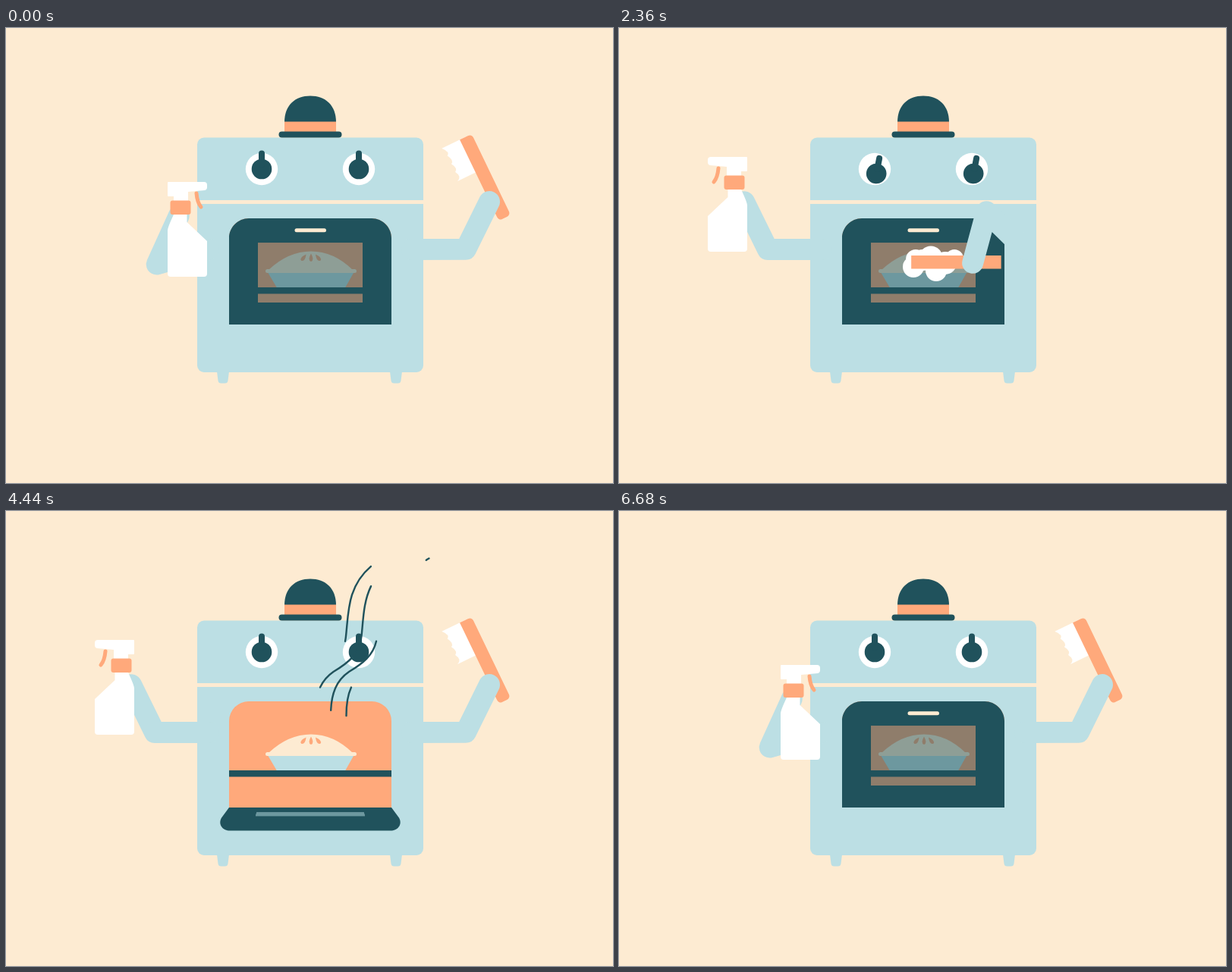
An HTML page with a canvas that plays this animation: 800 by 600 pixels, repeating every 6720 ms.

```html
<!DOCTYPE html>
<html lang="en">
<head>
<meta charset="utf-8">
<title>Cheerful oven</title>
<style>
html, body { margin: 0; height: 100%; overflow: hidden; background: #fdebd2; }
canvas { display: block; }
</style>
</head>
<body>
<canvas id="stage" width="800" height="600"></canvas>
<script>
const c = document.getElementById('stage').getContext('2d');
const LOOP = 6720, RAD = Math.PI / 180;
const CREAM = '#fdebd2', BLUE = '#bcdfe4', DARK = '#20525c', ORANGE = '#ffa97b', WHITE = '#fff';

const lerp = (a, b, k) => a + (b - a) * k;
const clamp = k => Math.max(0, Math.min(1, k));

// cubic-bezier(.55, 0, .25, 1)
function ease(x) {
  if (x <= 0) return 0;
  if (x >= 1) return 1;
  let lo = 0, hi = 1, p;
  for (let i = 0; i < 22; i++) {
    p = (lo + hi) / 2;
    const q = 1 - p;
    if (3 * p * q * q * .55 + 3 * p * p * q * .25 + p ** 3 < x) lo = p; else hi = p;
  }
  return p * p * (3 - 2 * p);
}

// keys: [time, ...values]
function track(keys, t) {
  let i = 0;
  while (i < keys.length - 1 && t >= keys[i + 1][0]) i++;
  const a = keys[i], b = keys[i + 1] || a;
  const k = b === a ? 0 : ease((t - a[0]) / (b[0] - a[0]));
  return a.slice(1).map((v, j) => lerp(v, b[j + 1], k));
}

function randomizer(seed) {
  return () => (seed = (seed * 16807) % 2147483647) / 2147483647;
}

function fill(path, color) {
  c.fillStyle = color;
  c.fill(typeof path === 'string' ? new Path2D(path) : path);
}
function box(x, y, w, h, r, color) {
  c.beginPath();
  c.roundRect(x, y, w, h, r);
  c.fillStyle = color;
  c.fill();
}
function dot(x, y, r, color) {
  c.beginPath();
  c.arc(x, y, Math.max(0, r), 0, 7);
  c.fillStyle = color;
  c.fill();
}
function at(x, y, angle, draw) {
  c.save();
  c.translate(x, y);
  c.rotate(angle * RAD);
  draw();
  c.restore();
}

// ---- limbs ----
const UPPER = 71, FORE = 70;
const LEFT = [267, 292], RIGHT = [535, 292];

function joints([sx, sy], upper, fore) {
  const ex = sx + UPPER * Math.cos(upper * RAD), ey = sy + UPPER * Math.sin(upper * RAD);
  return [sx, sy, ex, ey, ex + FORE * Math.cos(fore * RAD), ey + FORE * Math.sin(fore * RAD)];
}
function drawArm([sx, sy, ex, ey, hx, hy]) {
  c.beginPath();
  c.moveTo(sx, sy);
  c.lineTo(ex, ey);
  c.lineTo(hx, hy);
  c.lineWidth = 28;
  c.lineCap = c.lineJoin = 'round';
  c.strokeStyle = BLUE;
  c.stroke();
}
// joint angles that put the right hand at a point
function reach(x, y) {
  const dx = x - RIGHT[0], dy = y - RIGHT[1], d = Math.hypot(dx, dy);
  const bend = Math.acos((UPPER ** 2 + d * d - FORE ** 2) / (2 * UPPER * d));
  let upper = Math.atan2(dy, dx) + bend;
  let fore = Math.atan2(dy - UPPER * Math.sin(upper), dx - UPPER * Math.cos(upper));
  upper /= RAD;
  fore /= RAD;
  return [upper > 90 ? upper - 360 : upper, fore > 0 ? fore - 360 : fore];
}

const leftArmKeys = [
  [0, 164, -65.6], [520, 161, -25.5], [1250, 161, -25.5],
  [1950, 180, -116.2], [5840, 180, -116.2], [6640, 164, -65.6]
];
const bottleKeys = [
  [0, 230, 236, 0], [520, 274, 276, 26.5], [1250, 274, 276, 26.5],
  [1950, 152, 203, 0], [5840, 152, 203, 0], [6640, 230, 236, 0]
];
const turnKeys = [[0, 0], [1250, 0], [1950, 1], [5760, 1], [6560, 0]];

// upper, fore, grip along brush, grip across, brush angle, how far it faces the oven
const rest = [...reach(637, 229), 90.5, 9, -115.7, 0];
const scrub = (x, y) => [...reach(x, y), 81, 1, -180, 1];
const wiped = [...reach(412, 334), 99, 4, -180, 1];
const brushKeys = [
  [0, ...rest], [990, ...rest], [2060, ...scrub(486, 304)], [2250, ...scrub(440, 318)],
  [2490, ...scrub(486, 304)], [2730, ...scrub(440, 318)], [2960, ...scrub(486, 302)],
  [3190, ...wiped], [3290, ...wiped], [4240, ...rest]
];

// left pupil x, right pupil x, y, knob angle
const lookRight = [4, 4, 6, 21], lookMid = [-.5, -.5, 6, -4], lookLeft = [-3, -3, 7, -20];
const eyeKeys = [
  [0, 0, 0, 0, 0], [80, 0, 0, 0, 0], [600, 3, -3, 7, 25], [1250, 3, -3, 7, 25],
  [2060, ...lookRight], [2250, ...lookMid], [2490, ...lookRight], [2730, ...lookMid],
  [2960, ...lookRight], [3190, ...lookLeft], [3290, ...lookLeft], [3800, 0, 0, 0, 0]
];
const doorKeys = [[0, 0], [3560, 0], [4180, 1], [5840, 1], [6640, 0]];

// ---- oven ----
function drawBody() {
  box(252, 144.5, 298, 82.5, [9, 9, 0, 0], BLUE);
  box(252, 232, 298, 222, [0, 0, 9, 9], BLUE);
  for (const x of [278, 506])
    fill(`M${x},453h16l-1.5,12q-.5,3.5 -4,3.5h-5q-3.500,0 -4,-3.500z`, BLUE);
  fill('M367,124C367,102 381,89.500 401,89.500S435,102 435,124Z', DARK);
  box(367, 123.5, 68, 14, 0, ORANGE);
  box(359.5, 136.5, 83, 8, 4, DARK);
}

function drawEyes(t) {
  const [lx, rx, y, angle] = track(eyeKeys, t);
  for (const [x, dx] of [[337, lx], [465, rx]]) {
    dot(x, 186, 21.2, WHITE);
    at(x + dx, 186 + y, angle, () => {
      dot(0, 0, 13.3, DARK);
      box(-4, -24.5, 8, 22, 4, DARK);
    });
  }
}

function drawInside() {
  box(294, 251, 214, 140, [26, 26, 0, 0], ORANGE);
  fill('M346,319Q372,294.500 402,294.500T457,319Z', CREAM);
  for (const [x, angle] of [[392.5, 38], [402, 0], [411, -38]])
    at(x, 302.500, angle, () => fill('M0,-5Q5,3.500 0,5.500Q-5,3.500 0,-5Z', ORANGE));
  box(342, 318, 120, 5, 2.5, CREAM);
  fill('M345.500,323H458L447,342.500H357Z', BLUE);
  box(294, 342, 214, 8.5, 0, DARK);
}

function drawDoor(open) {
  const hinge = 391 - Math.min(4, (1 - open) * 68, open * 68);
  const edge = lerp(251, 421.5, open), depth = edge - hinge;
  const far = 107 + 15 * open, round = Math.min(26, Math.abs(depth) * .55);
  const inset = lerp(26, 16, open), up = Math.sign(depth) * round;
  const level = f => hinge + depth * f;
  const strip = (path, w, a, b) => {
    const wa = w * (1 + .12 * a * open), wb = w * (1 + .12 * b * open);
    path.moveTo(401 - wa, level(a));
    path.lineTo(401 - wb, level(b));
    path.lineTo(401 + wb, level(b));
    path.lineTo(401 + wa, level(a));
    path.closePath();
  };
  const side = 107 + (far - 107) * (1 - round / Math.max(1, Math.abs(depth))) * 1.5;
  const door = new Path2D(), glass = new Path2D();
  door.moveTo(294, hinge);
  door.lineTo(401 - side, edge - up);
  door.bezierCurveTo(401 - far, edge - up * .45, 401 - far + inset * .45, edge, 401 - far + inset, edge);
  door.lineTo(401 + far - inset, edge);
  door.bezierCurveTo(401 + far - inset * .45, edge, 401 + far, edge - up * .45, 401 + side, edge - up);
  door.lineTo(508, hinge);
  door.closePath();
  const top = lerp(.77, .37, open);
  strip(door, 69, .207, top);
  strip(glass, 69, .207, top);
  c.fillStyle = DARK;
  c.fill(door, 'evenodd');
  c.globalAlpha = .5;
  fill(glass, DARK);
  c.globalAlpha = 1;
  if (open < .99) {
    const h = 5 * Math.abs(depth) / 140;
    box(380.5, level(lerp(.888, .55, open)) - h / 2, 41.5, h, h / 2, CREAM);
  }
}

// ---- spray bottle ----
const bottleShape = new Path2D(
  'M-17,-32q0,-1 1,-1H31q4,0 4,4v3q0,3 -3,4L10,-20V-6H-9V-14H-16q-1,0 -1,-1Z' +
  'M-9,8H8.500V20L35,45V88q0,4 -4,4H-13q-4,0 -4,-4V31Q-17,27 -9,10Z');
const trigger = new Path2D('M21,-18Q22,-6 27,0');

function drawBottle(t) {
  const [x, y, angle] = track(bottleKeys, t);
  const turn = track(turnKeys, t)[0] * Math.PI;
  const thick = 5 * Math.sin(turn);
  const layer = (shift, draw) => {
    c.save();
    c.translate(shift * thick, 0);
    c.scale(Math.cos(turn) || .001, 1);
    draw();
    c.restore();
  };
  at(x, y, angle, () => {
    if (thick > .05)
      for (const s of [-1, -.5, 0, .5]) layer(s, () => fill(bottleShape, BLUE));
    layer(1, () => {
      c.strokeStyle = ORANGE;
      c.lineWidth = 5;
      c.stroke(trigger);
      fill(bottleShape, WHITE);
      box(-13.5, -8.5, 27, 18.5, 3, ORANGE);
    });
  });
}

function drawSpray(t) {
  const rnd = randomizer(4711);
  for (const start of [500, 930])
    for (let i = 0; i < 120; i++) {
      const angle = (36 + (rnd() + rnd() - 1) * 42) * RAD;
      const range = 70 + 130 * rnd() ** 1.5, size = .5 + 1.6 * rnd() ** 2;
      const alpha = .3 + .7 * rnd(), age = t - start - rnd() * 50;
      if (age < 0 || age > 560) continue;
      const d = 20 + range * (1 - Math.exp(-age / 190));
      c.globalAlpha = alpha * clamp((560 - age) / 200);
      dot(316 + d * Math.cos(angle), 264 + d * Math.sin(angle) + 12 * (age / 500) ** 2, size, WHITE);
    }
  c.globalAlpha = 1;
}

// ---- scrubbing ----
const foam = [
  [388, 315, 14], [391, 305, 13], [411, 303, 15.5], [442, 304, 12],
  [430, 310, 15], [418, 320, 14], [400, 306, 14]
];
function drawFoam(t) {
  if (t < 1800 || t > 3160) return;
  const push = ease((t - 2990) / 190);
  foam.forEach(([x, y, r], i) => {
    const grow = ease((t - 1800 - i * 30) / 340) * (1 - push);
    const sway = 1.5 * Math.sin((t - 2360) / 80 + i) - 1.5 * Math.sin(i);
    dot(x + sway - 95 * push, y + 14 * push, r * grow, WHITE);
  });
}

const drops = [
  [236, 314, 3.5], [250, 313, 3], [257, 321, 3.5], [240, 326, 6], [250, 335, 5],
  [279, 339, 5], [286, 314, 5], [262, 306, 4], [270, 304.5, 5.5], [243, 324, 4]
];
function drawDrops(t) {
  const k = (t - 3080) / 120;
  if (k < 0 || k > 3.4) return;
  const out = (1 - Math.exp(-k / 1.6)) / (1 - Math.exp(-1 / 1.6));
  c.save();
  c.beginPath();
  c.rect(0, 304, 800, 296);
  c.clip();
  for (const [x, y, r] of drops)
    dot(lerp(318, x, out), lerp(328, y, out) + 6 * (k * k - k), r * clamp((3.4 - k) / 1.8), WHITE);
  c.restore();
}

function drawBrush(x, y, along, across, angle, facing) {
  const ux = Math.cos(angle * RAD), uy = Math.sin(angle * RAD);
  at(x + along * ux - across * uy, y + along * uy + across * ux, angle, () => {
    const reachOut = -lerp(35, 10.5, facing), wave = 5 * (1 - facing);
    c.beginPath();
    c.moveTo(0, facing * 10.5);
    c.lineTo(0, reachOut);
    for (let i = 0; i < 4; i++)
      c.quadraticCurveTo(-12 * i - 9, reachOut + wave * 1.6, -12 * (i + 1), reachOut + (i < 3 ? wave * .5 : 0));
    c.lineTo(-48, facing * 10.5);
    c.fillStyle = WHITE;
    c.fill();
    const r = 5 * (1 - facing);
    box(-118.5, -8.7, 118.5, 17.4, [r, 0, r, r], ORANGE);
  });
}

// ---- steam ----
const STEAM = 'M428,270C428,245 433,225 452,212C472,200 487,188 489,165C493,130 490,90 537,62.500';
const steamPath = new Path2D(STEAM);
const probe = document.createElementNS('http://www.w3.org/2000/svg', 'path');
probe.setAttribute('d', STEAM);
const steamLength = probe.getTotalLength();

function drawSteam(t) {
  const gap = 84, life = 600;
  c.strokeStyle = DARK;
  c.lineWidth = 2.4;
  c.lineCap = 'round';
  for (const start of [3516, 4020, 5454])
    for (let i = 0; i < 4; i++) {
      const age = t - start - i * gap;
      const head = ease(age / life), tail = ease((age - 2 * gap) / life);
      if (head - tail < .002) continue;
      c.save();
      c.translate((i - 2) * 20.5, 0);
      c.setLineDash([(head - tail) * steamLength, 999]);
      c.lineDashOffset = -tail * steamLength;
      c.stroke(steamPath);
      c.restore();
    }
}

function draw() {
  const t = performance.now() % LOOP;
  c.fillStyle = CREAM;
  c.fillRect(0, 0, 800, 600);
  drawBody();
  drawEyes(t);
  drawInside();
  drawDoor(track(doorKeys, t)[0]);
  drawSpray(t);
  drawArm(joints(LEFT, ...track(leftArmKeys, t)));
  drawBottle(t);
  drawFoam(t);
  drawDrops(t);
  const [upper, fore, ...grip] = track(brushKeys, t);
  const arm = joints(RIGHT, upper, fore);
  drawBrush(arm[4], arm[5], ...grip);
  drawArm(arm);
  drawSteam(t);
  requestAnimationFrame(draw);
}
draw();
</script>
</body>
</html>
```
